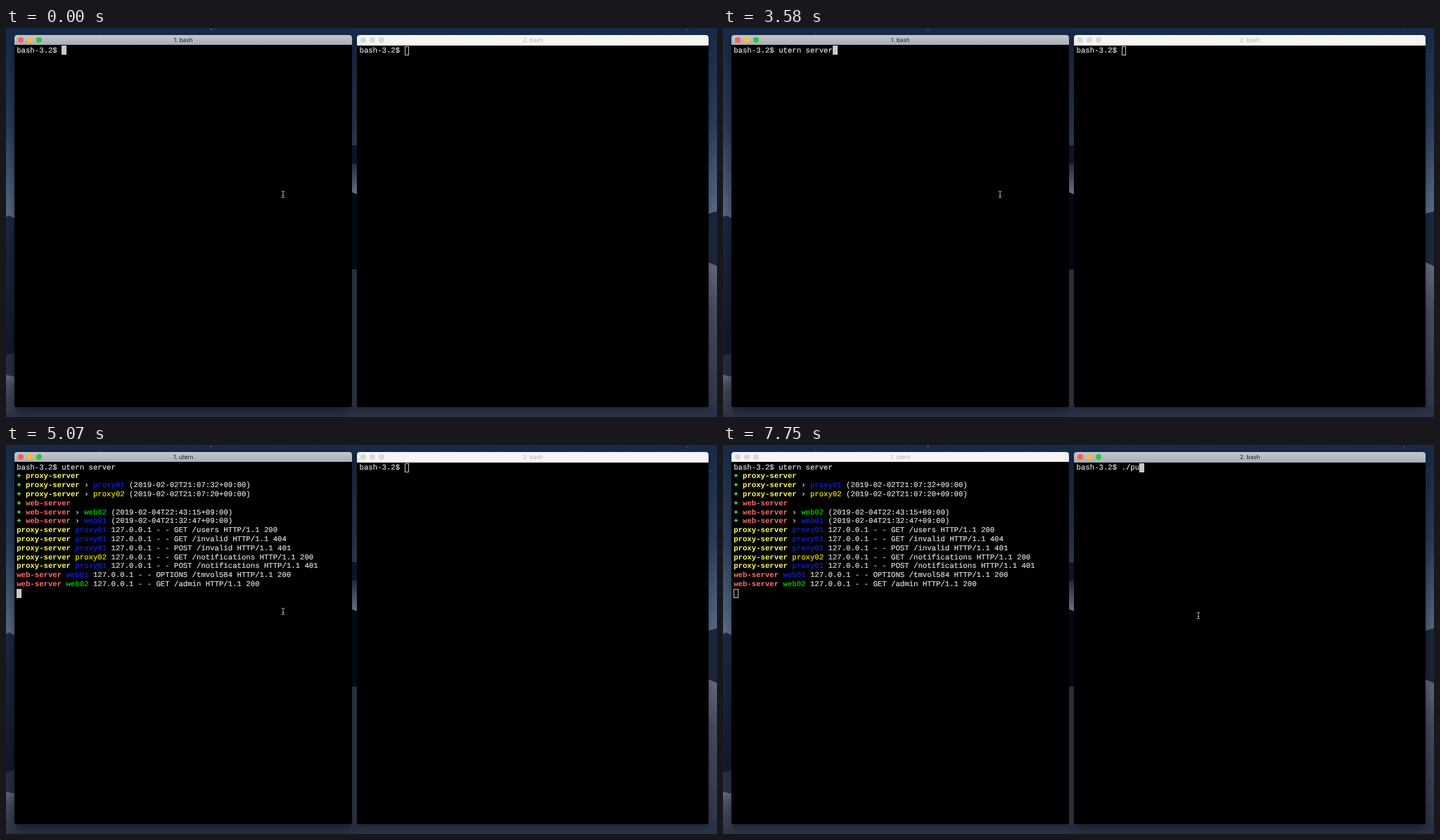
Recreate the animation shown at these times as an HTML page. Size 1011 by 554 pixels, loop 8 s.

```html
<!DOCTYPE html>
<html lang="en">
<head>
<meta charset="utf-8">
<title>Log tailing in two terminals</title>
<style>
html, body { margin: 0; width: 100%; height: 100%; overflow: hidden; background: #18243a; }
#stage { position: relative; width: 1011px; height: 554px; overflow: hidden; }
#stage > svg { position: absolute; left: 0; top: 0; }
.win {
  position: absolute; background: #000; border-radius: 4px 4px 3px 3px;
  box-shadow: 0 3px 8px rgba(0,0,0,.3);
}
.win.on { z-index: 1; box-shadow: 0 6px 16px rgba(0,0,0,.45); }
.bar {
  position: relative; height: 14.6px; border-radius: 4px 4px 0 0; background: #f5f5f5;
  color: #b4b4b4; font: 8.2px/14.6px Inter, Roboto, sans-serif; text-align: center;
  text-rendering: geometricPrecision;
}
.on .bar { background: linear-gradient(#c3c7ce, #a9adb4); color: #1c1d1f; }
.dot { position: absolute; top: 3px; width: 8px; height: 8px; border-radius: 50%; background: #d9d9d9; }
.on .dot { background: var(--c); }
.row {
  position: absolute; left: 3.2px; white-space: pre; color: #e0e0e0;
  font: 10.667px/12.8px "Liberation Mono", "DejaVu Sans Mono", monospace;
  text-rendering: geometricPrecision; font-variant-ligatures: none;
  -webkit-text-stroke: .2px currentColor;
}
.cursor { position: absolute; box-sizing: border-box; width: 6.6px; height: 13px; border: 1px solid #c4c4c4; }
.on .cursor { background: #c9c9c9; border-color: #c9c9c9; }
.group, .plus { font-weight: bold; -webkit-text-stroke-width: 0; }
.plus { color: #5ffa68; }
.yellow { color: #fffc67; }
.red { color: #ff6e67; }
.blue { color: #0a27e0; }
.gold { color: #ece800; }
.green { color: #00d000; }
#mouse { z-index: 2; }
</style>
</head>
<body>
<div id="stage">
  <svg width="1011" height="554">
    <defs>
      <linearGradient id="sky" x2="0" y2="1">
        <stop offset="0" stop-color="#172a48"/><stop offset=".5" stop-color="#2a3c5a"/>
        <stop offset="1" stop-color="#5a6c88"/>
      </linearGradient>
      <linearGradient id="ridge" x2="0" y2="1">
        <stop offset="0" stop-color="#1d2941"/><stop offset="1" stop-color="#0b1424"/>
      </linearGradient>
      <linearGradient id="dune" x2="0" y2="1">
        <stop offset="0" stop-color="#626a7e"/><stop offset=".3" stop-color="#444b5e"/>
        <stop offset="1" stop-color="#2c3447"/>
      </linearGradient>
      <linearGradient id="glow" x2="0" y2="1">
        <stop offset="0" stop-color="#273650"/><stop offset="1" stop-color="#8a90a2"/>
      </linearGradient>
    </defs>
    <rect width="1011" height="275" fill="url(#sky)"/>
    <path d="M0 269L5 267L12 271V554H0z" fill="url(#ridge)"/>
    <path d="M0 466L12 463V554H0z" fill="#272f42"/>
    <path d="M490 167H502V194H490z" fill="#101c33"/>
    <path d="M490 193H502V238H490z" fill="url(#glow)"/>
    <path d="M490 233L502 238V346H490z" fill="#050c1e"/>
    <path d="M490 344H502V554H490z" fill="#343b4d"/>
    <path d="M997 265L1011 261V340H997z" fill="#1c263b"/>
    <path d="M997 333L1011 339V554H997z" fill="url(#dune)"/>
    <path d="M0 538H1011V554H0z" fill="#2b3346"/>
    <path d="M0 494L14 497V554H0z" fill="url(#dune)"/>
    <g fill="#8795ad">
      <rect x="131" y="8" width="1" height="1"/><rect x="291" y="1" width="1" height="2"/>
      <rect x="968" y="2" width="1" height="1"/><rect x="1001" y="37" width="1" height="1"/>
    </g>
  </svg>
  <svg id="mouse" width="10" height="14" viewBox="-5 -7 10 14">
    <path d="M-2.3-4.5Q-.4-4.5 0-3.6Q.4-4.5 2.3-4.5M0-3.6V3.6M-2.3 4.5Q-.4 4.5 0 3.6Q.4 4.5 2.3 4.5M-1.1 1.4H1.1" fill="none" stroke="#cfcfcf" stroke-width=".9"/>
  </svg>
</div>
<script>
const LOOP = 8000, CELL = 6.4, LINE = 12.8, PROMPT = 'bash-3.2$ ';
const stage = document.getElementById('stage');
const mouse = document.getElementById('mouse');

const output = [
  '+ proxy-server',
  '+ proxy-server › proxy01 (2019-02-02T21:07:32+09:00)',
  '+ proxy-server › proxy02 (2019-02-02T21:07:20+09:00)',
  '+ web-server',
  '+ web-server › web02 (2019-02-04T22:43:15+09:00)',
  '+ web-server › web01 (2019-02-04T21:32:47+09:00)',
  'proxy-server proxy01 127.0.0.1 - - GET /users HTTP/1.1 200',
  'proxy-server proxy01 127.0.0.1 - - GET /invalid HTTP/1.1 404',
  'proxy-server proxy01 127.0.0.1 - - POST /invalid HTTP/1.1 401',
  'proxy-server proxy02 127.0.0.1 - - GET /notifications HTTP/1.1 200',
  'proxy-server proxy01 127.0.0.1 - - POST /notifications HTTP/1.1 401',
  'web-server web01 127.0.0.1 - - OPTIONS /tmvol584 HTTP/1.1 200',
  'web-server web02 127.0.0.1 - - GET /admin HTTP/1.1 200'
];
const styles = {
  '+': 'plus', 'proxy-server': 'group yellow', 'web-server': 'group red',
  proxy01: 'blue', web01: 'blue', proxy02: 'gold', web02: 'green'
};

// Timelines in ms
const leftKeys = [1040, 1340, 1490, 1640, 1790, 2090, 2690, 2840, 2990, 3290, 3430, 3580];
const rightKeys = [7150, 7300, 7600, 7750];
const shown = [[0, -1], [3880, 0], [4030, 1], [4180, 4], [4320, 6], [4770, 11], [5070, 13]];
const pointer = [[0, [394, 237]], [5970, [470, 239]], [6120, [620, 242]], [6260, [676, 243]]];
const RENAME = 4620, FOCUS = 6410;

const typed = (keys, t) => keys.filter(k => k <= t).length;
const at = (steps, t) => steps.filter(s => s[0] <= t).pop()[1];

function add(parent, cls, text = '') {
  const el = document.createElement('div');
  el.className = cls;
  el.textContent = text;
  parent.append(el);
  return el;
}

function addRow(win, i) {
  const row = add(win, 'row');
  row.style.top = 17.1 + i * LINE + 'px';
  return row;
}

function makeWindow(x, y, w, h) {
  const win = add(stage, 'win');
  Object.assign(win.style, { left: x + 'px', top: y + 'px', width: w + 'px', height: h + 'px' });
  const bar = add(win, 'bar');
  const title = add(bar, 'title');
  ['#ff5f57', '#febc2e', '#28c840'].forEach((c, i) => {
    const dot = add(bar, 'dot');
    dot.style.left = 5 + i * 12.8 + 'px';
    dot.style.setProperty('--c', c);
  });
  return { win, title, prompt: addRow(win, 0), cursor: add(win, 'cursor') };
}

function moveCursor(term, col, row) {
  term.cursor.style.left = 3.2 + col * CELL + 'px';
  term.cursor.style.top = 15.9 + row * LINE + 'px';
}

const left = makeWindow(12, 9.5, 480.3, 530);
const right = makeWindow(499.4, 10.2, 499.6, 530);

const rows = output.map((line, i) => {
  const row = addRow(left.win, i + 1);
  row.innerHTML = line.replace(/^\+|(proxy|web)-server|(proxy|web)0\d/g,
    word => `<span class="${styles[word]}">${word}</span>`);
  return row;
});
right.title.textContent = '2. bash';

function draw(t) {
  const n = typed(leftKeys, t), m = typed(rightKeys, t), count = at(shown, t);
  left.prompt.textContent = PROMPT + 'utern server'.slice(0, n);
  right.prompt.textContent = PROMPT + './pu'.slice(0, m);
  rows.forEach((row, i) => { row.style.visibility = i < count ? 'visible' : 'hidden'; });
  moveCursor(left, count < 0 ? PROMPT.length + n : 0, count + 1);
  moveCursor(right, PROMPT.length + m, 0);
  left.title.textContent = t < RENAME ? '1. bash' : '1. utern';
  left.win.classList.toggle('on', t < FOCUS);
  right.win.classList.toggle('on', t >= FOCUS);
  const [x, y] = at(pointer, t);
  mouse.style.left = x - 5 + 'px';
  mouse.style.top = y - 7 + 'px';
}

function tick() {
  draw(performance.now() % LOOP);
  requestAnimationFrame(tick);
}
tick();
</script>
</body>
</html>
```
